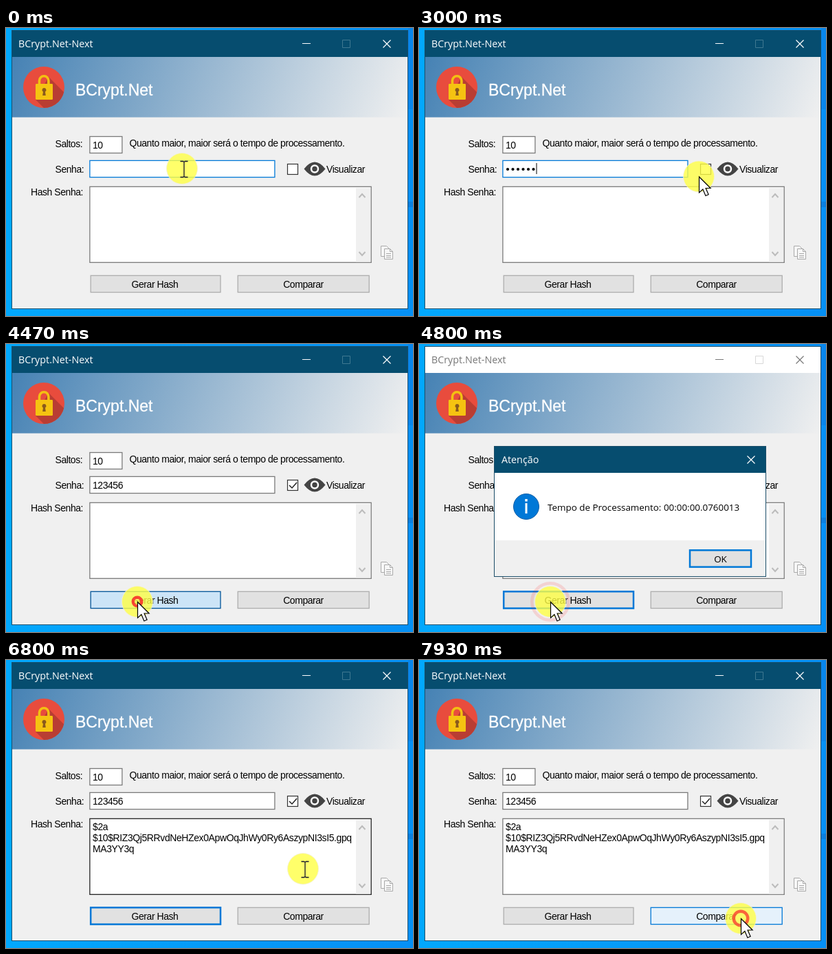
An HTML page that plays this animation: 592 px wide and 418 px high, repeating every 8000 ms.

```html
<!DOCTYPE html>
<html lang="pt">
<head>
<meta charset="utf-8">
<title>BCrypt.Net-Next</title>
<style>
  html, body { margin: 0; width: 592px; height: 418px; overflow: hidden; }
  svg { display: block; }
  text { font: 14px "Liberation Sans", Arial, sans-serif; letter-spacing: -.45px; fill: #000; white-space: pre; }
  .mid { text-anchor: middle; }
  .ui { font: 14.3px "Open Sans", "Noto Sans", sans-serif; letter-spacing: 0; }
  .white { fill: #fff; }
  .msg { font-size: 13.4px; }
  .banner { font-size: 23px; letter-spacing: 0; fill: #fff; stroke: #fff; stroke-width: .3px; }
  .hash text { letter-spacing: -.4px; }
  .field, .btn { stroke-width: 1.3; }
  .field { fill: #fff; stroke: #7a7a7a; }
  .btn { fill: #e1e1e1; stroke: #adadad; }
  .btn.focus { stroke: #0078d7; stroke-width: 2.5; }
  .btn.hover { fill: #e5f1fb; stroke: #0078d7; stroke-width: 1.3; }
  .btn.down { fill: #cce4f7; stroke: #005499; stroke-width: 1.3; }
  .field.hover { stroke: #222; }
  .field.focus { stroke: #0078d7; }
  .check { fill: #fff; stroke: #333; stroke-width: 1.2; }
  .check.hover { stroke: #0078d7; }
  .line { fill: none; }
  .bar { fill: #064d6f; }
  .titlebar text { fill: #fff; }
  .titlebar .glyph { stroke: #fff; stroke-width: 1.2; }
  .titlebar .off { stroke: #3f7891; }
  .titlebar.inactive .bar { fill: #fff; }
  .titlebar.inactive text { fill: #777; }
  .titlebar.inactive .glyph { stroke: #777; }
  .titlebar.inactive .off { stroke: #d8d8d8; }
</style>
</head>
<body>
<svg width="592" height="418" viewBox="0 0 592 418">
  <defs>
    <linearGradient id="sky" x2="1" y2="0">
      <stop stop-color="#02a8fd"/><stop offset=".5" stop-color="#059bf8"/><stop offset="1" stop-color="#0590f5"/>
    </linearGradient>
    <linearGradient id="steel" gradientUnits="userSpaceOnUse" x1="28" y1="-12" x2="565" y2="183">
      <stop stop-color="#4682b4"/><stop offset="1" stop-color="#f0f0f0"/>
    </linearGradient>
    <clipPath id="disc"><circle cx="55" cy="86" r="30"/></clipPath>
  </defs>

  <!-- desktop -->
  <rect width="592" height="418" fill="url(#sky)"/>
  <rect x="585" width="7" height="118" fill="#0886ec"/>
  <rect x="585" y="252" width="7" height="8" fill="#0a7fe0"/>

  <!-- window -->
  <rect x="8" y="3" width="577" height="405" fill="#174f6b"/>
  <rect x="9" y="42" width="575" height="365" fill="#f0f0f0"/>
  <g id="titlebar" class="titlebar">
    <rect class="bar" x="9" y="4" width="575" height="38"/>
    <text class="ui" x="18" y="28">BCrypt.Net-Next</text>
    <path class="line glyph" d="M431 22.5h12M548.5 17.5l11 11m0-11l-11 11"/>
    <path class="line off" d="M489.500 17.500h11v11h-11z"/>
  </g>
  <rect x="9" y="42" width="575" height="87.600" fill="url(#steel)"/>

  <!-- padlock -->
  <circle cx="55" cy="86" r="30" fill="#e84c3d"/>
  <path clip-path="url(#disc)" d="M62 71L92 101V126H65L43 104z" fill="#b93d33"/>
  <path class="line" d="M48.500 82v-5.500a6.700 6.700 0 0 1 13.400 0v5.500" stroke="#f3c012" stroke-width="3.600"/>
  <rect x="43" y="81" width="25" height="23" rx="1.200" fill="#f5c311"/>
  <path d="M55.500 87a3 3 0 0 1 1.500 5.600l.8 5.400h-4.600l.8-5.400a3 3 0 0 1 1.500-5.600" fill="#8a5a1c"/>
  <text class="banner" x="101" y="98">BCrypt.Net</text>

  <!-- form -->
  <text x="71.500" y="173">Saltos:</text>
  <rect class="field" x="121.900" y="157.500" width="47" height="24"/>
  <text x="126" y="174.500">10</text>
  <text x="179.500" y="172">Quanto maior, maior será o tempo de processamento.</text>

  <text x="71.500" y="210">Senha:</text>
  <rect id="pass" class="field" x="121.900" y="192.400" width="269" height="24.200"/>
  <g id="dots"></g>
  <text id="plain" x="126" y="209.500">123456</text>
  <rect id="caret" y="196" width="1" height="16"/>

  <rect id="check" class="check" x="409.500" y="197.500" width="15" height="15"/>
  <path id="tick" class="line" d="M412 205l4 4 7-8" stroke="#222" stroke-width="1.500"/>
  <path d="M433.500 204.500q15.500-20 31 0q-15.500 20-31 0" fill="#444"/>
  <circle cx="449" cy="204.500" r="5" fill="#444" stroke="#fff" stroke-width="2.500"/>
  <text x="466" y="210">Visualizar</text>

  <text x="36" y="243">Hash Senha:</text>
  <rect id="area" class="field" x="121.900" y="230.300" width="409.300" height="110"/>
  <rect x="509" y="232" width="21" height="107.500" fill="#f0f0f0"/>
  <path class="line" d="M513.500 246l4.500-5 4.500 5M513.500 325l4.500 5 4.500-5" stroke="#bcbcbc" stroke-width="2"/>
  <g id="hash" class="hash">
    <text x="126" y="247">$2a</text>
    <text x="126" y="263">$10$RIZ3Qj5RRvdNeHZex0ApwOqJhWy0Ry6AszypNI3sI5.gpq</text>
    <text x="126" y="279">MA3YY3q</text>
  </g>
  <g fill="#f7f7f7" stroke="#a9a9a9">
    <path d="M545.500 316.500h8l4 4v11h-12z"/>
    <path d="M550.500 320.500h8l4 4v11h-12z"/>
    <path class="line" d="M558.500 320.500v4h4M553 327.500h7m-7 3h7m-7 2.500h7"/>
  </g>

  <rect id="make" class="btn" x="123.200" y="359.300" width="188.800" height="24.300"/>
  <text class="mid" x="216.500" y="377">Gerar Hash</text>
  <rect id="compare" class="btn" x="337.200" y="359.300" width="191" height="24.300"/>
  <text class="mid" x="432.500" y="377">Comparar</text>

  <!-- message box -->
  <g id="dialog">
    <rect x="109" y="148" width="396" height="190" fill="#1b4d68"/>
    <rect class="bar" x="110" y="149" width="394" height="38"/>
    <rect x="110" y="187" width="394" height="98" fill="#fff"/>
    <rect x="110" y="285" width="394" height="52" fill="#f0f0f0"/>
    <text class="ui white" x="120" y="173">Atenção</text>
    <path class="line" d="M477.500 162.500l11 11m0-11l-11 11" stroke="#fff" stroke-width="1.200"/>
    <circle cx="156" cy="236" r="18.500" fill="#0078d7" stroke="#0b5ea6"/>
    <path d="M154.500 231h3v15h-3zM154.300 225h3.400v3.400h-3.400z" fill="#fff"/>
    <text class="ui msg" x="187" y="242">Tempo de Processamento: 00:00:00.0760013</text>
    <rect id="ok" class="btn focus" x="394" y="299.300" width="89" height="24.300"/>
    <text class="ui msg mid" x="438.500" y="317">OK</text>
  </g>

  <!-- pointer -->
  <g id="pointer">
    <circle r="22.500" fill="#ffff45" fill-opacity=".8" stroke="#f4f0d8" stroke-opacity=".8"/>
    <circle id="ring" class="line" stroke="#fa2a2a" stroke-width="4.500"/>
    <path id="beam" class="line" d="M-2.500-10.500h4l1.500 1 1.500-1h4M-2.500 12.500h4l1.500-1 1.500 1h4M3-10v22" stroke="#15152e" stroke-width="1.300"/>
    <path id="arrow" d="M.500.500v23l5.400-5 4 9.500 4.200-1.800-4-9.200h7z" fill="#fff" stroke="#000" stroke-width="1.200"/>
  </g>
</svg>
<script>
  const LOOP = 8000, STEP = 200 / 3;
  const el = {};
  document.querySelectorAll('[id]').forEach(e => el[e.id] = e);

  const keys = [867, 1133, 1400, 1667, 1933, 2267];
  const clicks = { check: 3333, make: 4400, ok: 6067, compare: 7800 };
  const HOLD = 133, RIPPLE = 470;
  const path = [ // time, x, y
    [0, 256, 204], [2467, 256, 204], [2600, 290, 216], [2800, 365, 228], [2933, 402, 220],
    [3067, 412, 211], [3667, 412, 211], [3800, 356, 232], [3933, 297, 257], [4133, 213, 360],
    [4333, 191, 374], [4867, 191, 374], [4933, 225, 350], [5000, 275, 323], [5133, 390, 297],
    [5267, 436, 300], [5333, 440, 303], [6733, 440, 303], [6800, 432, 303], [7000, 412, 312],
    [7200, 418, 330], [7400, 452, 361], [7600, 468, 375], [LOOP, 468, 375]
  ];

  el.dots.innerHTML = keys.map((_, i) => `<circle cx="${129 + 7.5 * i}" cy="205" r="2.1"/>`).join('');
  const dots = [...el.dots.children];

  const show = (e, on) => e.setAttribute('visibility', on ? 'visible' : 'hidden');
  const move = (e, attrs) => { for (const k in attrs) e.setAttribute(k, attrs[k]); };

  function pointerAt(t) {
    const i = path.findIndex(p => p[0] > t);
    const [t0, x0, y0] = path[i - 1], [t1, x1, y1] = path[i];
    const k = (t - t0) / (t1 - t0);
    return [x0 + (x1 - x0) * k, y0 + (y1 - y0) * k];
  }

  function inside(e, [x, y]) {
    const [l, t, w, h] = ['x', 'y', 'width', 'height'].map(n => +e.getAttribute(n));
    return x >= l && x <= l + w && y >= t && y <= t + h;
  }

  function draw(t) {
    const pos = pointerAt(t);
    const modal = t >= 4600 && t < 6200;
    const revealed = t >= clicks.check + HOLD;
    const typed = keys.filter(k => t >= k).length;
    const over = name => inside(el[name], pos) && modal === (name === 'ok');
    const style = (name, focused) => {
      const list = el[name].classList;
      list.toggle('focus', focused);
      list.toggle('hover', over(name));
      list.toggle('down', t >= clicks[name] && t < clicks[name] + HOLD);
    };

    style('pass', t < clicks.check);
    style('area', false);
    style('check', false);
    style('make', t >= clicks.make && t < clicks.compare);
    style('compare', t >= clicks.compare);
    style('ok', true);

    dots.forEach((d, i) => show(d, i < typed && !revealed));
    show(el.plain, revealed);
    show(el.tick, revealed);
    show(el.caret, t >= 333 && t < clicks.check);
    move(el.caret, { x: 125.5 + 7.5 * typed });
    show(el.hash, t >= 6200);
    el.dialog.style.display = modal ? '' : 'none';
    el.titlebar.classList.toggle('inactive', modal);

    const text = over('pass') || over('area');
    el.pointer.style.display = t >= 800 && t < 2467 ? 'none' : '';
    move(el.pointer, { transform: `translate(${pos})` });
    show(el.beam, text);
    show(el.arrow, !text);

    const age = Math.min(...Object.values(clicks).map(c => t < c ? Infinity : t - c));
    const live = age < RIPPLE;
    show(el.ring, live);
    if (live) move(el.ring, { r: 2 + age * .062, opacity: 1 - age / RIPPLE });
  }

  const start = performance.now();
  function tick() {
    const t = (performance.now() - start) % LOOP;
    const n = Math.floor((t + 6.7) / STEP) % (LOOP / STEP);
    draw(Math.round(n * STEP));
    requestAnimationFrame(tick);
  }
  tick();
</script>
</body>
</html>
```
